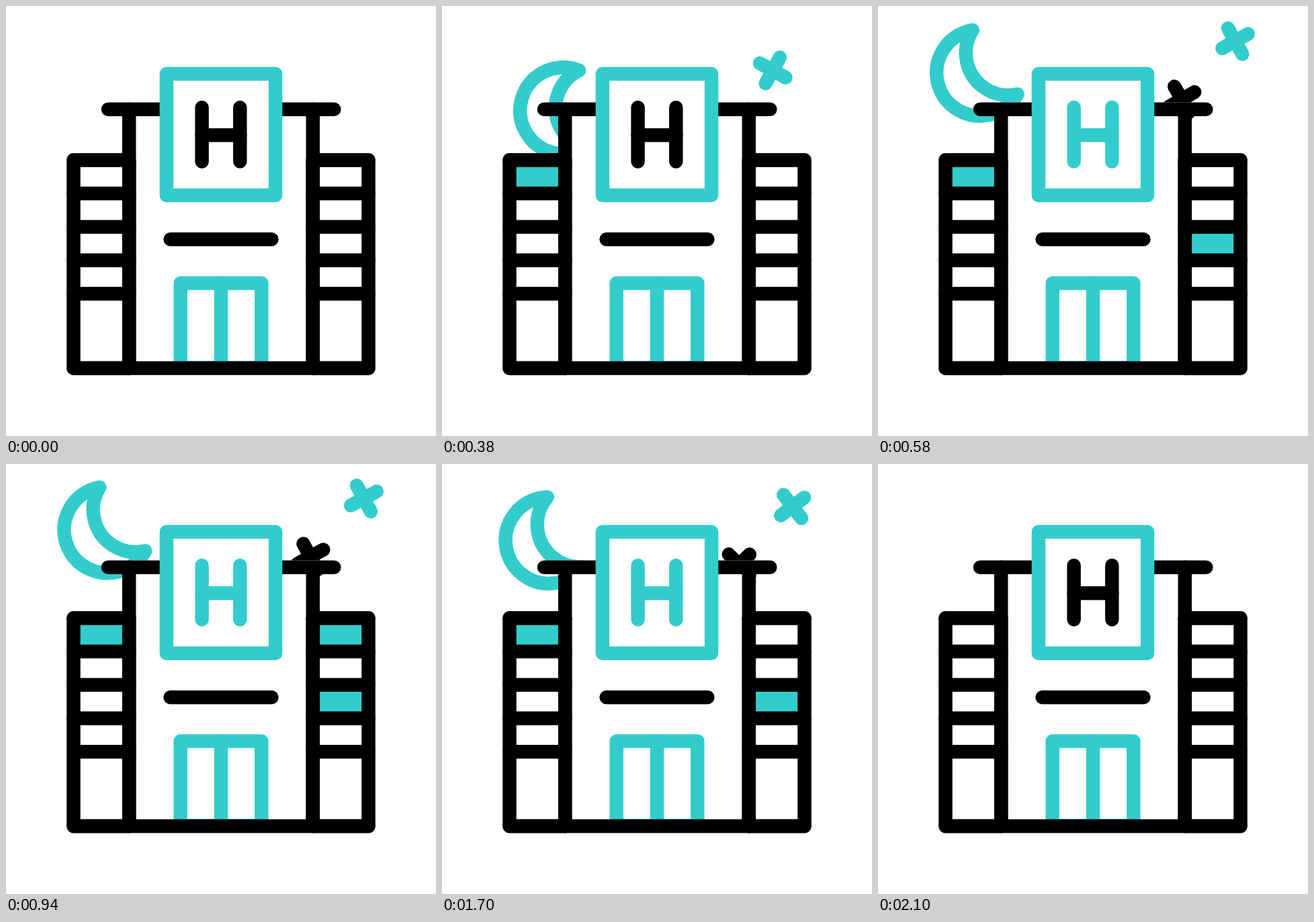
Animation of 640 by 640 pixels, one loop 2.4 s. Source, as an HTML page with a canvas:

```html
<!DOCTYPE html>
<html lang="en">
<head>
<meta charset="utf-8">
<title>Hospital at night</title>
<style>
  html, body { margin: 0; width: 100%; height: 100%; overflow: hidden; background: #fff; }
  canvas { display: block; width: 100vw; height: 100vh; }
</style>
</head>
<body>
<canvas id="stage" width="640" height="640"></canvas>
<script>
const ctx = document.getElementById('stage').getContext('2d');
const LOOP = 2400, STEP = 20;
const BLACK = '#000', TEAL = '#33cccc', WHITE = '#fff';
const RISE_START = 10, SET_START = 1590, TRAVEL = 600;
const ROWS = [229.3, 279, 328.7, 378.6, 428.2];

const rad = deg => deg * Math.PI / 180;
const smooth = v => {
  const x = Math.min(1, Math.max(0, v));
  return x * x * (3 - 2 * x);
};
const during = (t, from, to) => t >= from && t < to;

// 1 = hidden behind the building, 0 = up in the sky
function sunk(t) {
  return t < 1000
    ? 1 - smooth((t - RISE_START) / TRAVEL)
    : smooth((t - SET_START) / TRAVEL);
}

function line(color, ...pts) {
  ctx.strokeStyle = color;
  ctx.beginPath();
  for (let i = 0; i < pts.length; i += 2) ctx.lineTo(pts[i], pts[i + 1]);
  ctx.stroke();
}

function frame(color, x1, y1, x2, y2) {
  ctx.strokeStyle = color;
  ctx.strokeRect(x1, y1, x2 - x1, y2 - y1);
}

function fill(color, x1, y1, x2, y2) {
  ctx.fillStyle = color;
  ctx.fillRect(x1, y1, x2 - x1, y2 - y1);
}

function placed(x, y, deg, draw) {
  ctx.save();
  ctx.translate(x, y);
  ctx.rotate(rad(deg));
  draw();
  ctx.restore();
}

function star(color, x, y, deg) {
  placed(x, y, deg, () => {
    line(color, -22, 0, 22, 0);
    line(color, 0, -22, 0, 22);
  });
}

// Crescent: outer circle cut by a second circle
function moon(x, y, deg) {
  const R = 64.4, r = 63, cx = 41.8, cy = -30;
  const d = Math.hypot(cx, cy), dir = Math.atan2(cy, cx);
  const outer = Math.acos((R * R + d * d - r * r) / (2 * R * d));
  const inner = Math.PI - Math.acos((r * r + d * d - R * R) / (2 * r * d));
  placed(x, y, deg, () => {
    ctx.strokeStyle = TEAL;
    ctx.beginPath();
    ctx.arc(0, 0, R, dir + outer, dir - outer + 2 * Math.PI);
    ctx.arc(cx, cy, r, dir - inner + 2 * Math.PI, dir + inner, true);
    ctx.closePath();
    ctx.stroke();
  });
}

function sky(k) {
  moon(151 + 90.5 * k, 98 + 175.7 * k, 97 * k);
  star(TEAL, 532.5 - 122.7 * k, 51.3 + 135.7 * k, 61.5 - 99.5 * k);
  star(BLACK, 453 - 122.7 * k, 138 + 135.7 * k, 61.5 - 180 * k);
}

function wing(outer, inner) {
  frame(BLACK, outer, ROWS[0], inner, 539);
  for (const y of ROWS) line(BLACK, outer, y, inner, y);
}

function building(t) {
  const leftLit = during(t, 370, 1940);
  const rightTopLit = during(t, 940, 1500);
  const rightLowLit = during(t, 540, 1780);
  const signLit = during(t, 540, 1780);

  fill(WHITE, 173, 143.5, 467, 539);
  fill(WHITE, 100, 229, 540, 539);
  if (leftLit) fill(TEAL, 105, 235, 178, 274);
  if (rightTopLit) fill(TEAL, 462, 235, 535, 274);
  if (rightLowLit) fill(TEAL, 462, 334, 535, 373);

  frame(TEAL, 259.7, 412.6, 380.3, 538.5);
  line(TEAL, 320, 412.6, 320, 538.5);

  wing(100.5, 183.2);
  wing(539.5, 456.8);
  line(BLACK, 183.2, 153.7, 183.2, 539);
  line(BLACK, 456.8, 153.7, 456.8, 539);
  line(BLACK, 100.5, 539, 539.5, 539);
  line(BLACK, 152, 153.7, 236, 153.7);
  line(BLACK, 404, 153.7, 488.3, 153.7);
  line(BLACK, 244.6, 347.2, 395.4, 347.2);

  frame(TEAL, 238.9, 100.9, 401.1, 281.8);
  const letter = signLit ? TEAL : BLACK;
  line(letter, 291.6, 151, 291.6, 231.4);
  line(letter, 348.3, 151, 348.3, 231.4);
  line(letter, 291.6, 192.3, 348.3, 192.3);
}

function draw() {
  const t = Math.floor((performance.now() % LOOP) / STEP) * STEP;
  fill(WHITE, 0, 0, 640, 640);
  ctx.lineWidth = 20.5;
  ctx.lineCap = ctx.lineJoin = 'round';
  sky(sunk(t));
  building(t);
  requestAnimationFrame(draw);
}
draw();
</script>
</body>
</html>
```
